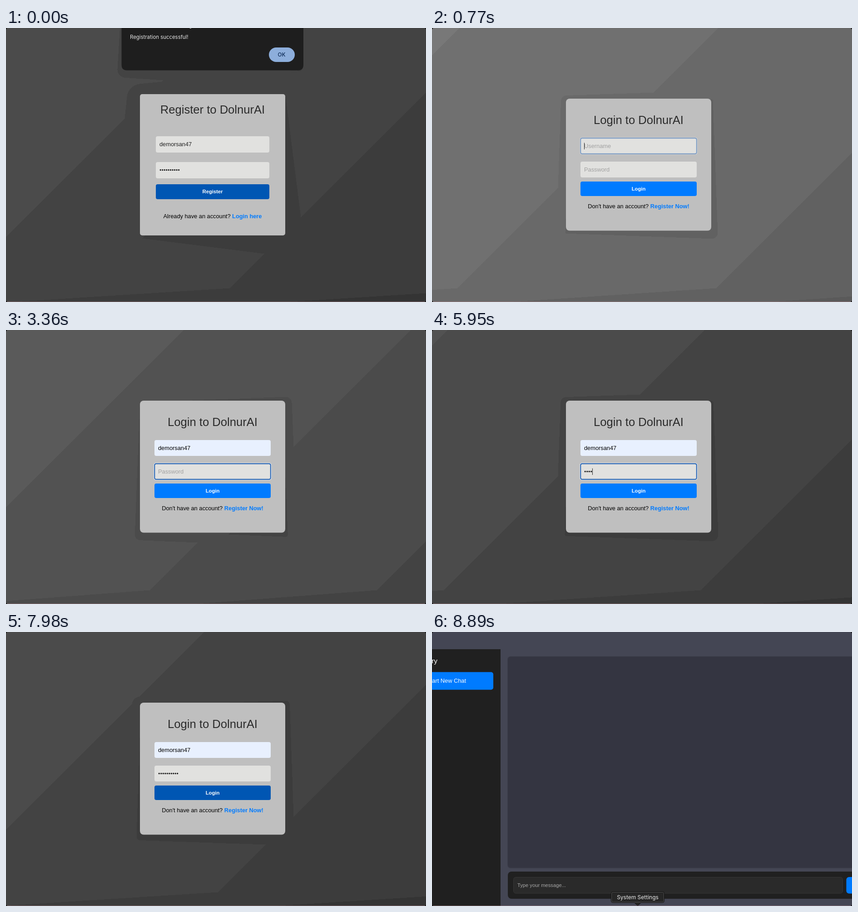
These frames come from a looping animation (925 by 605 pixels, 9.17 s). An HTML page with a canvas:

```html
<!DOCTYPE html>
<html lang="en">
<head>
<meta charset="utf-8">
<title>Login flow</title>
<style>
  html, body { margin: 0; width: 100%; height: 100%; overflow: hidden; background: #434343; }
  canvas, svg { position: absolute; left: 0; top: 0; width: 100%; height: 100%; display: block; }
  text { font-family: "Liberation Sans", Arial, sans-serif; font-size: 12.8px; white-space: pre; }
  .sys { font-family: Inter, Roboto, sans-serif; }
  .head { font-size: 25.6px; fill: #2b2b2b; }
  .btn { font-size: 11.2px; font-weight: bold; fill: #fff; }
  .link { font-weight: bold; fill: #007bff; }
  .hint { fill: #a0a0a0; }
</style>
</head>
<body>
<canvas id="bg" width="925" height="605"></canvas>
<svg id="stage" viewBox="0 0 925 605"></svg>
<script>
const W = 925, H = 605, LOOP = 9170, STEP = 70;
const BRAND = 'DolnurAI', USER = 'demorsan47', DOT = 4.48;
const FIELD = '#e1e1df', FILLED = '#e8f0fe', BLUE = [0, 123, 255], DEEP = [0, 86, 179];

const clamp = v => Math.max(0, Math.min(1, v));
const ramp = (t, a, b) => clamp((t - a) / (b - a));
const within = (t, ...spans) => spans.some(([a, b]) => t >= a && t < b);

// ---- markup helpers
const rect = (x, y, x2, y2, r, fill, more = '') =>
  `<rect x="${x}" y="${y}" width="${x2 - x}" height="${y2 - y}" rx="${r}" fill="${fill}" ${more}/>`;
const text = (x, y, str, more = '') => `<text x="${x}" y="${y}" ${more}>${str}</text>`;
const mid = (y, str, cls, x = 455) => text(x, y, str, `class="${cls}" text-anchor="middle"`);
const group = (id, body) => `<g id="${id}">${body}</g>`;
const footer = (y, ask, link) =>
  mid(y, `${ask} <tspan class="link">${link}</tspan>`, 'foot');
const dots = (x, y, n) => Array.from({ length: n }, (_, i) =>
  `<circle cx="${x + DOT * (i + 0.5)}" cy="${y}" r="1.65" fill="#222"/>`).join('');
const ring = (id, y) => group(id,
  rect(325.4, y - 1.6, 584.6, y + 36.6, 5, '#eef3fb') +
  rect(326.3, y - 0.7, 583.7, y + 35.7, 4.2, '#1c5db0') +
  rect(328.2, y + 1.2, 581.8, y + 33.8, 2.5, FIELD));
const caret = id => `<rect id="${id}" width="1" height="14.5" fill="#222"/>`;

const registerPage = group('register',
  rect(295, 146, 615, 458, 5, '#bfbfbf') +
  mid(189, 'Register to ' + BRAND, 'head') +
  rect(330, 239, 580, 275, 4, FIELD) + text(338, 261, USER, 'fill="#222"') +
  rect(330, 296, 580, 332, 4, FIELD) + dots(338, 313.5, 10) +
  rect(330, 345, 580, 378, 4, '#0056b3') + mid(365, 'Register', 'btn') +
  footer(420, 'Already have an account?', 'Login here'));

const loginPage = group('login',
  rect(295, 156, 615, 447.5, 8, '#bfbfbf') +
  mid(212, 'Login to ' + BRAND, 'head') +
  rect(327, 243, 583, 278, 4, FIELD, 'id="userBox"') + ring('userRing', 243) +
  text(335, 265, '', 'id="userText"') + caret('userCaret') +
  rect(327, 295, 583, 330, 4, FIELD) + ring('passRing', 295) +
  text(335, 317, 'Password', 'id="passHint" class="hint"') +
  group('passDots', dots(335, 312.5, 10)) + caret('passCaret') +
  rect(327, 339, 583, 371, 4, '#007bff', 'id="loginBtn"') + mid(359, 'Login', 'btn') +
  footer(397.5, "Don't have an account?", 'Register Now!') +
  group('popup',
    rect(415, 287, 554, 327, 7, '#000', 'opacity=".18"') +
    '<path d="M424 288L431.5 280.5Q433 279 434.5 280.5L442 288Z" fill="#1b1b1b"/>' +
    rect(416.2, 287.8, 553, 324.6, 5, '#343434', 'stroke="#1a1a1a" stroke-width="2.4"') +
    text(426, 311, USER, 'class="sys" style="font-size:11.4px" fill="#ececec"') +
    '<path d="M530.5 302.5l8 8m0-8l-8 8" stroke="#dcdcdc" stroke-width="1.2"/>'));

const alertBox = group('alert',
  '<path id="alertShape" fill="#1e1e1e"/>' +
  group('alertBody',
    rect(404.5, -1, 408, 1, 0.5, '#d8d8d8') +
    text(273, 24, 'Registration successful!',
      'id="alertText" class="sys" style="font-size:11.4px" fill="#e6e6e6"') +
    rect(579, 43, 636, 75, 16, '#8daedb') +
    text(607, 63.3, 'OK',
      'class="sys" style="font-size:11.6px;font-weight:500" fill="#0c2a55" text-anchor="middle"')));

const chatPage = group('chat',
  rect(0, 0, W, H, 0, '#444654') +
  rect(0, 38, 151, H, 0, '#202020') +
  text(12, 69, 'History', 'text-anchor="end" style="font-size:15.4px" fill="#fff"') +
  rect(-60, 88.5, 135, 127.5, 5, '#007bff') +
  text(75, 112, 'Start New Chat', 'text-anchor="end" fill="#fff"') +
  rect(166, 53.5, 960, 522, 7, '#3c3e4a') +
  rect(167, 54.5, 960, 520.5, 6, '#343541') +
  rect(167, 529, 960, 589, 8, '#202020') +
  rect(179.5, 541.5, 904.5, 577, 5, '#2a2a2a', 'stroke="#363636"') +
  text(188, 563, 'Type your message...', 'style="font-size:11.2px" fill="#a8a8a8"') +
  rect(912.5, 541, 960, 577.5, 6, '#007bff') +
  group('tip',
    '<path d="M394.5 577.5a4 4 0 0 1 4-4h109a4 4 0 0 1 4 4v16a4 4 0 0 1-4 4h-47.5l-7 7-7-7h-47.5a4 4 0 0 1-4-4z" fill="#262626" stroke="#0a0a0a"/>' +
    rect(395.5, 574.5, 510.5, 596.5, 3, 'none', 'stroke="#555"') +
    mid(590, 'System Settings', 'sys" style="font-size:12px" fill="#ececec', 453)));

document.getElementById('stage').innerHTML =
  registerPage + loginPage + alertBox + chatPage +
  rect(0, 604, W, 605, 0, '#be8c91', 'opacity=".5"') +
  `<path d="M0 0h3L0 3zM${W} 0v3l-3-3zM0 ${H}v-3l3 3zM${W} ${H}h-3l3-3z" fill="#1a1a1a"/>`;

const el = {};
document.querySelectorAll('[id]').forEach(n => el[n.id] = n);
const set = (id, attrs) => { for (const k in attrs) el[id].setAttribute(k, attrs[k]); };
const show = (id, on) => { el[id].style.display = on ? '' : 'none'; };

// ---- banded diagonal backdrop with card shadows
const ctx = el.bg.getContext('2d');
const image = ctx.createImageData(W, H);
const pixels = new Uint32Array(image.data.buffer);

// [left, top, right, bottom, strength, reach]
function shadeField(boxes) {
  const field = new Float32Array(W * H);
  for (let y = 0, i = 0; y < H; y++) {
    const low = 0.73 * ramp(y, 574, 604);
    for (let x = 0; x < W; x++, i++) {
      let shade = low;
      for (const [l, t, r, b, power, reach] of boxes) {
        const dx = Math.max(l - x, 0, x - r), dy = Math.max(t - y, 0, y - b);
        shade += power * clamp(1 - Math.hypot(dx, dy) / reach);
      }
      field[i] = shade;
    }
  }
  return field;
}
const alertShade = [262, -30, 647, 90, 0.65, 25];
const loginShade = [295, 160, 615, 451, 0.9, 18];
const fields = {
  register: shadeField([[295, 152, 615, 464, 0.5, 34], alertShade]),
  leaving: shadeField([loginShade, alertShade]),
  login: shadeField([loginShade])
};

// [time, level at the top left corner, band width]
const tones = [[0, 9.76, 606], [70, 12.8, 605], [140, 15.76, 604], [1890, 13.94, 509],
  [3360, 11.78, 500], [5950, 10.06, 566], [7980, 9.72, 605], [LOOP, 9.76, 606]];

function toneAt(t) {
  let i = 0;
  while (i < tones.length - 2 && t >= tones[i + 1][0]) i++;
  const [t0, a0, w0] = tones[i], [t1, a1, w1] = tones[i + 1];
  const p = (t - t0) / (t1 - t0);
  return [a0 + (a1 - a0) * p, w0 + (w1 - w0) * p];
}

function drawBackdrop(t) {
  const [level, width] = toneAt(t);
  const field = t < 70 ? fields.register : t < 210 ? fields.leaving : fields.login;
  const greys = Array.from({ length: 24 }, (_, k) => {
    const g = Math.floor(7.5 * (k + 1));
    return (255 << 24 | g << 16 | g << 8 | g) >>> 0;
  });
  for (let y = 0, i = 0; y < H; y++)
    for (let x = 0; x < W; x++, i++)
      pixels[i] = greys[Math.max(0, Math.floor(level - (x + y) / width - field[i]))];
  ctx.putImageData(image, 0, 0);
}

// ---- foreground
function drawAlert(p) {
  const l = 254.5 + 1.5 * p, r = 655 - 2 * p, b = 93.5 - 11.5 * p, c = 12 - 3 * p;
  const tl = 254.5 + 7.5 * p, tr = 655 - 6 * p, s = 1 - 0.022 * p;
  set('alertShape', { d: `M${tl} -1L${l} ${b - c}Q${l} ${b} ${l + c} ${b}H${r - c}Q${r} ${b} ${r} ${b - c}L${tr} -1Z` });
  set('alertBody', { transform: `matrix(${s} 0 0 1 ${455 * (1 - s) + 0.5 * p} ${-12.4 * p})` });
  set('alertText', { transform: `translate(${3 * p} 0) skewX(${-7 * p})` });
  set('alert', { opacity: 1 - 0.6 * p });
}

const keyTimes = [4620, 4900, 5670, 5950, 6300, 6440, 6720, 6860, 7000, 7140];

function drawLogin(t) {
  const filled = t >= 2310;
  const name = t < 1470 ? 'Username' : filled ? USER : USER[0];
  el.userText.textContent = name;
  set('userText', { fill: t < 1470 ? '#a0a0a0' : filled ? '#000' : '#222' });
  set('userBox', { fill: filled ? FILLED : FIELD });
  el.userRing.lastChild.setAttribute('fill', filled ? FILLED : FIELD);
  set('userRing', { opacity: ramp(t, 700, 840) * (1 - ramp(t, 2660, 2800)) });
  set('userCaret', { x: 335 + (t < 1470 ? 0 : filled ? 71.2 : 7.1), y: 253.5 });
  show('userCaret', within(t, [770, 1330], [1470, 1960], [2310, 2730]));

  const count = keyTimes.filter(k => t >= k).length;
  show('passHint', !count);
  [...el.passDots.children].forEach((d, i) => { d.style.display = i < count ? '' : 'none'; });
  set('passRing', { opacity: ramp(t, 2660, 2800) * (1 - ramp(t, 7700, 7980)) });
  set('passCaret', { x: 335 + DOT * count, y: 305.5 });
  show('passCaret', within(t, [2730, 3360], [3850, 4410], [4620, 5460], [5670, 7700]));

  const hover = ramp(t, 7210, 7560);
  set('loginBtn', { fill: `rgb(${BLUE.map((c, i) => Math.round(c + (DEEP[i] - c) * hover))})` });
  set('popup', { opacity: ramp(t, 1680, 1820) * (1 - ramp(t, 2310, 2450)) });
}

function draw(t) {
  const chat = t >= 8400;
  show('register', t < 70);
  show('alert', t < 210);
  show('login', t >= 70 && !chat);
  show('chat', chat);
  if (chat) {
    show('tip', t >= 8750);
    set('tip', { transform: `translate(${t < 8890 ? 13 : 0} 0)` });
    return;
  }
  drawBackdrop(t);
  if (t < 210) drawAlert(t / 140);
  if (t >= 70) drawLogin(t);
}

const start = performance.now();
let last = -1;
function tick() {
  const t = Math.floor((performance.now() - start) % LOOP / STEP) * STEP;
  if (t !== last) draw(last = t);
  requestAnimationFrame(tick);
}
tick();
</script>
</body>
</html>
```
